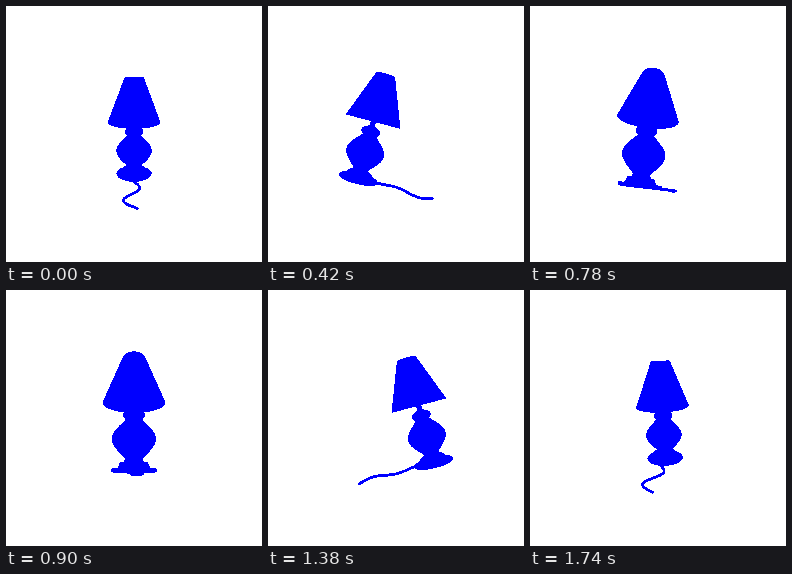
An HTML page with a canvas for the animation above (1.8 s loop, 256x256 px).

```html
<!DOCTYPE html>
<html lang="en">
<head>
<meta charset="utf-8">
<title>Turning lamp</title>
<style>
html, body { margin: 0; width: 100%; height: 100%; overflow: hidden; background: #fff; }
canvas { display: block; width: 100vw; height: 100vh; image-rendering: pixelated; }
</style>
</head>
<body>
<canvas id="stage" width="256" height="256"></canvas>
<script>
const SIZE = 256, LOOP = 1800, STEP = 60;
const DIST = 265;                      // camera distance
const TILT = 15 * Math.PI / 180;       // lean of the lamp
const BASE = { out: -38, y: -43.7 };   // foot of the lamp, relative to the spin axis
const ctx = document.getElementById('stage').getContext('2d', { willReadFrequently: true });

const mix = (a, b, t) => a + (b - a) * t;
const cone = (a, b) => t => mix(a, b, t);
const ball = r => t => r * Math.sqrt(1 - (2 * t - 1) ** 2);
const vase = (rim, belly) => t => rim + (belly - rim) * Math.max(0, Math.sin(Math.PI * t)) ** 1.2;

// Turned parts, bottom to top: radius is a function of 0..1 along the height
const parts = [
  { name: 'foot', from: -2.4, to: -0.2, radius: cone(19.2, 19.2) },
  { name: 'step', from: -0.2, to: 5, radius: cone(14, 12) },
  { name: 'collar', from: 5, to: 8, radius: cone(9, 7.5) },
  { name: 'vase', from: 8, to: 44, radius: vase(7, 19) },
  { name: 'neck', from: 42.8, to: 53.2, radius: ball(9.6) },
  { name: 'stem', from: 52, to: 58.5, radius: cone(2.6, 2.6) },
  { name: 'shade', from: 58.5, to: 106, radius: cone(28, 9.7) }
];

// side, height, forward in lamp space -> screen
function project(side, up, fwd, spin) {
  const out = BASE.out + up * Math.sin(TILT) + fwd * Math.cos(TILT);
  const y = BASE.y + up * Math.cos(TILT) - fwd * Math.sin(TILT);
  const x = out * Math.sin(spin) + side * Math.cos(spin);
  const z = out * Math.cos(spin) - side * Math.sin(spin);
  const s = DIST / (DIST - z);
  return [SIZE / 2 + x * s, SIZE / 2 - y * s];
}

function disc(up, r, spin) {
  ctx.beginPath();
  for (let i = 0; i < 48; i++) {
    const a = i / 48 * Math.PI * 2;
    ctx.lineTo(...project(r * Math.cos(a), up, r * Math.sin(a), spin));
  }
  ctx.closePath();
  ctx.fill();
  ctx.stroke();
}

function drawPart({ from, to, radius }, spin) {
  const n = Math.ceil((to - from) / 0.5);
  ctx.lineWidth = 0.5;
  for (let k = 0; k <= n; k++) disc(mix(from, to, k / n), radius(k / n), spin);
}

// The cord snakes away from the foot in widening swings
function drawCord(spin) {
  ctx.lineWidth = 2.8;
  ctx.beginPath();
  for (let fwd = 17; fwd <= 77; fwd++) {
    const side = 0.155 * fwd * Math.sin(Math.PI * (fwd - 23) / 26);
    ctx.lineTo(...project(side, -0.6, fwd, spin));
  }
  ctx.stroke();
}

// Hard edges: every pixel is either blue or white
function harden() {
  const img = ctx.getImageData(0, 0, SIZE, SIZE), d = img.data;
  for (let i = 0; i < d.length; i += 4) {
    d[i] = d[i + 1] = d[i] < 128 ? 0 : 255;
    d[i + 2] = 255;
  }
  ctx.putImageData(img, 0, 0);
}

function draw(step) {
  const spin = step * STEP / LOOP * Math.PI * 2;
  ctx.fillStyle = '#fff';
  ctx.fillRect(0, 0, SIZE, SIZE);
  ctx.fillStyle = ctx.strokeStyle = '#00f';
  ctx.lineCap = ctx.lineJoin = 'round';
  drawCord(spin);
  for (const part of parts) drawPart(part, spin);
  harden();
}

const start = performance.now();
let shown = -1;
function tick() {
  const t = (performance.now() - start) % LOOP;
  const step = Math.floor(t / STEP);
  if (step !== shown) draw(shown = step);
  requestAnimationFrame(tick);
}
tick();
</script>
</body>
</html>
```
